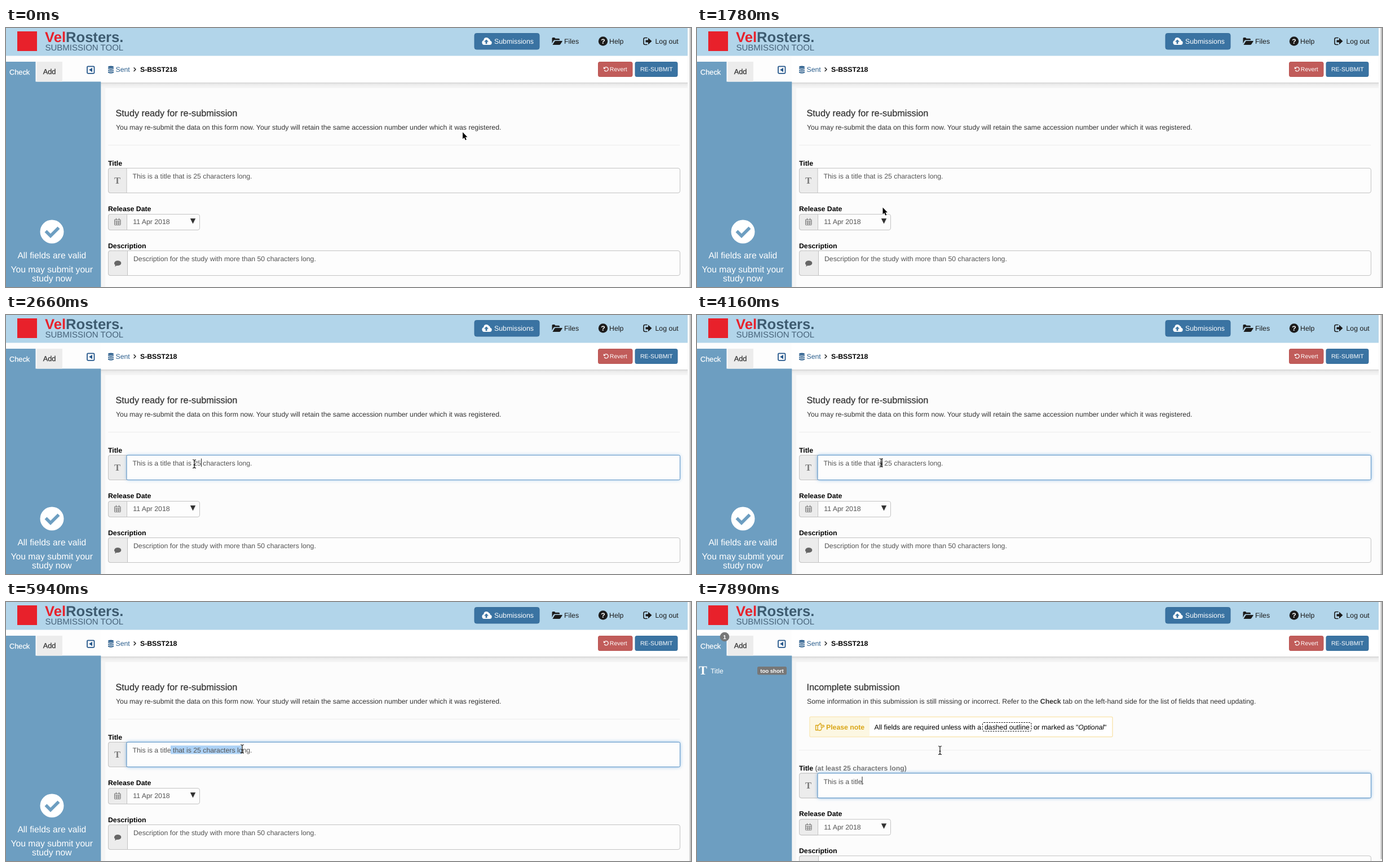
Write an HTML page that moves like this. It is 1215 px wide and 461 px high and loops after 8 s.

```html
<!DOCTYPE html>
<html lang="en">
<head>
<meta charset="utf-8">
<title>Study form</title>
<style>
html, body { margin: 0; width: 100%; height: 100%; overflow: hidden; background: #fff; }
svg { display: block; width: 100%; height: 100%; }
text { font: 12.28px "Liberation Sans", Arial, sans-serif; fill: #333; text-rendering: geometricPrecision; white-space: pre; }
.b { font-weight: 700; }
.k { fill: #000; }
.w { fill: #fff; }
.m { stroke: currentColor; stroke-width: .25; }
.nav { font-size: 12.35px; fill: #1c1c1c; }
.tab { font-size: 12.8px; }
.btn { font-size: 10.5px; fill: #fff; }
.head { font-size: 16.25px; color: #333; }
.in { fill: #555; }
.msg { font-size: 15.65px; fill: #fff; text-anchor: middle; }
.serif { font-family: "Liberation Serif", "Times New Roman", serif; font-weight: 700; text-anchor: middle; }
.box { fill: #fdfdfd; stroke: #c2c2c2; }
.add { fill: #ececec; stroke: #c2c2c2; }
.line { fill: none; stroke-linecap: round; stroke-linejoin: round; }
#glow { filter: drop-shadow(0 0 3.4px rgba(70, 145, 215, .7)); }
</style>
</head>
<body>
<svg viewBox="0 0 1215 461" preserveAspectRatio="none">
  <defs>
    <linearGradient id="shade" x2="0" y2="1">
      <stop stop-color="#d2d2d2"/><stop offset=".35" stop-color="#ebebeb"/><stop offset="1" stop-color="#f5f5f5"/>
    </linearGradient>
  </defs>

  <!-- page -->
  <rect width="1215" height="461" fill="#fdfdfd"/>
  <rect x="168" y="97" width="1041" height="364" fill="#f5f5f5"/>
  <rect x="168" y="97" width="1041" height="9" fill="url(#shade)"/>
  <rect x="176" y="107" width="1033" height="354" fill="#fcfcfc"/>
  <rect x="168" y="50" width="1041" height="47" fill="#fff"/>
  <rect width="1209" height="49.5" fill="#b2d5ea"/>
  <rect x="1209" width="6" height="461" fill="#fafafa"/>
  <rect id="thumb" x="1212.5" y="-4" width="2.5" height="469" rx="1.2" fill="#c3c3c3"/>

  <!-- header -->
  <rect x="20" y="6" width="35" height="35" fill="#e8212b"/>
  <text x="69" y="24.5" class="b" style="font-size:25.6px;fill:#e8212b">Vel<tspan fill="#3d5b70">Rosters.</tspan></text>
  <text x="69.5" y="39.5" style="font-size:15px;fill:#47637a">SUBMISSION TOOL</text>
  <rect x="831" y="9.5" width="115" height="28.5" rx="3.5" fill="#3a73a2" stroke="#366d9a"/>
  <path d="M848 30a4.3 4.3 0 0 1-.8-8.3 5.2 5.2 0 0 1 9.6-2.3 3.2 3.2 0 0 1 2 3.3 3.7 3.7 0 0 1-1 7.3z" fill="#fff"/>
  <path d="M852 20.5l-4 4h2.6v3.8h2.8v-3.8h2.6z" fill="#3a73a2"/>
  <text x="866" y="28" class="nav" style="fill:#fff">Submissions</text>
  <g fill="#1c1c1c">
    <path d="M968.5 27.5V18.5q0-1.5 1.5-1.5h3l1.500 1.800h6q1.500 0 1.500 1.500v1.200h-8.500q-1.500 0-2.500 1.200z"/>
    <path d="M969.500 30l3.500-6q.7-1 1.800-1h11.200q1.200 0 .6 1l-3.300 5q-.8 1-2 1z"/>
    <circle cx="1059" cy="23.5" r="8.2"/>
    <path d="M1137 17.5h-3.5q-2.5 0-2.5 2.5v7q0 2.5 2.5 2.5h3.5" class="line" stroke="#1c1c1c" stroke-width="1.6"/>
    <path d="M1134.5 21.500h4.500v-4l6.500 6-6.500 6v-4h-4.500z"/>
  </g>
  <text x="1059" y="28" class="b w" style="text-anchor:middle">?</text>
  <text x="990" y="28" class="nav">Files</text>
  <text x="1070" y="28" class="nav">Help</text>
  <text x="1151.5" y="28" class="nav">Log out</text>

  <!-- breadcrumb -->
  <g fill="#2e608e">
    <ellipse cx="186" cy="69.5" rx="5" ry="2"/>
    <path id="disk" d="M181 71.2q5 2.4 10 0v1.8q-5 2.8-10 0z"/>
    <use href="#disk" y="3.2"/>
    <use href="#disk" y="6.4"/>
  </g>
  <text x="194.5" y="78.300" style="fill:#2e608e">Sent</text>
  <path d="M227 70.8l3 3-3 3" class="line" stroke="#111" stroke-width="1.3"/>
  <text x="238" y="78.3" class="b k">S-BSST218</text>
  <rect x="1050.5" y="60.500" width="60.500" height="26" rx="2.600" fill="#c15c5a" stroke="#bb5553"/>
  <path d="M1061.300 71.500a3.700 3.700 0 1 1 .3 4" class="line" stroke="#fff" stroke-width="1.300"/>
  <path d="M1059.800 69v3.800h3.800z" fill="#fff"/>
  <text x="1070.800" y="77.300" class="btn">Revert</text>
  <rect x="1116" y="60.500" width="75" height="26" rx="2.600" fill="#3a73a2" stroke="#366d9a"/>
  <text x="1125" y="77.300" class="btn">RE-SUBMIT</text>

  <!-- sidebar -->
  <rect y="95.500" width="168.300" height="366" fill="#6d9ec1"/>
  <rect y="60" width="52.500" height="37" fill="#6d9ec1"/>
  <rect x="54.500" y="60" width="45.500" height="35.500" fill="#ececec"/>
  <text x="6" y="82.500" class="tab w m" color="#fff">Check</text>
  <text x="65.700" y="82.300" class="tab m" color="#333">Add</text>
  <rect x="144" y="68.300" width="12.500" height="12.500" rx="1.500" fill="none" stroke="#24568a" stroke-width="1.800"/>
  <path d="M153 70.800v7.600l-5.800-3.800z" fill="#24568a"/>
  <g id="valid">
    <circle cx="81.500" cy="362.500" r="21" fill="#fff"/>
    <path d="M70.500 361.500l8.500 8.500 14.500-14.500" fill="none" stroke="#6d9ec1" stroke-width="5.600"/>
    <text x="81.300" y="409.800" class="msg">All fields are valid</text>
    <text x="81.300" y="435" class="msg">You may submit your</text>
    <text x="81.300" y="451.300" class="msg">study now</text>
  </g>
  <g id="invalid">
    <circle cx="49" cy="62" r="8.300" fill="#777"/>
    <text x="49" y="65.500" class="b w" style="font-size:10px;text-anchor:middle">1</text>
    <text x="10.700" y="129" class="serif w" style="font-size:22px">T</text>
    <text x="24" y="126.500" class="w">Title</text>
    <rect x="107" y="115" width="52" height="14.500" rx="2.500" fill="#777"/>
    <text x="133" y="125.500" class="b w" style="font-size:9.600px;text-anchor:middle">too short</text>
  </g>

  <!-- notices -->
  <g id="ready">
    <text x="194.500" y="157.300" class="head m">Study ready for re-submission</text>
    <text x="195" y="181.300">You may re-submit the data on this form now. Your study will retain the same accession number under which it was registered.</text>
  </g>
  <g id="incomplete">
    <text x="194.500" y="157.300" class="head m">Incomplete submission</text>
    <text x="195" y="181.300">Some information in this submission is still missing or incorrect. Refer to the <tspan class="b">Check</tspan> tab on the left-hand side for the list of fields that need updating.</text>
    <rect x="200" y="204.500" width="537" height="35.500" rx="2" fill="#fff" stroke="#f9e6b4" stroke-width="1.500"/>
    <rect x="200.700" y="205.200" width="105.300" height="34" fill="#fcf7e2"/>
    <path d="M210.500 219.500h3.500v8.500h-3.500zM214 219.500h1.500l3.200-3.700q2 .3 1 3.700h5q1.700 1.400 0 2.800h-5.200M221.500 222.300q.8 1.200-.5 2.300.5 1.300-.7 2.100 0 1.800-1.800 1.800h-2l-2.500-.8" class="line" stroke="#d9a514" stroke-width="1.300"/>
    <text x="229" y="226.500" class="b" style="fill:#d9a514">Please note</text>
    <text x="314.500" y="226.500" class="k">All fields are required unless with a</text>
    <rect x="506.500" y="214.500" width="86.500" height="15.500" rx="2.500" fill="none" stroke="#000" stroke-dasharray="2.600 1.800"/>
    <text x="510" y="226.500" class="k">dashed outline</text>
    <text x="597" y="226.500" class="k">or marked as "<tspan font-style="italic">Optional</tspan>"</text>
  </g>

  <!-- fields -->
  <g id="form">
    <path d="M181 208.500H1195.500" stroke="#ededed"/>
    <text x="181" y="244.500" class="b k">Title<tspan id="hint" x="209.500" fill="#777">(at least 25 characters long)</tspan></text>
    <rect x="181.500" y="249.500" width="1014" height="44" rx="3.500" class="box"/>
    <path d="M214 249.500H185q-3.500 0-3.500 3.500v37q0 3.500 3.500 3.500h29z" class="add"/>
    <text x="197.500" y="276.500" class="serif" style="font-size:16.500px;fill:#777">T</text>
    <g id="focus">
      <rect id="glow" x="214" y="249.500" width="981.500" height="44" rx="2" fill="#5a93c6"/>
      <rect x="214" y="249.500" width="981.500" height="44" rx="2" fill="#fdfdfd" stroke="#5a93c6"/>
    </g>
    <rect id="sel" x="292" y="255.500" height="15" fill="#acd1f5"/>
    <text id="value" x="224.500" y="268.300" class="in"></text>
    <path id="caret" d="M0 255.500v14.500" stroke="#222"/>

    <text x="181" y="326" class="b k">Release Date</text>
    <rect x="181.500" y="331.500" width="162" height="28" rx="3.500" class="box"/>
    <path d="M214.500 331.500H185q-3.500 0-3.500 3.500v21q0 3.500 3.500 3.500h29.500z" class="add"/>
    <path d="M193 341h10v9.500h-10zM193 344h10M193 347.200h10M196.300 344v6.500M199.700 344v6.500M195.500 339v2.500M200.500 339v2.500" class="line" stroke="#6a6a6a" stroke-width=".9"/>
    <text x="225.300" y="349.300" class="in">11 Apr 2018</text>
    <path d="M326.800 339h9.400l-4.700 9.500z" fill="#333"/>

    <text x="181" y="391.700" class="b k">Description</text>
    <rect x="181.500" y="396.500" width="1014" height="44" rx="3.500" class="box"/>
    <path d="M215.500 396.500H185q-3.500 0-3.500 3.500v37q0 3.500 3.500 3.500h30.500z" class="add"/>
    <path d="M198.300 414c8 0 8 9 0 9q-1 0-2-.2-1.500 1.500-3.500 1.700 1-1 1-2.500c-4-3-1-8 4.500-8z" fill="#666"/>
    <text x="226" y="415.300" class="in">Description for the study with more than 50 characters long.</text>
  </g>

  <!-- pointers -->
  <path id="arrow" d="M0 0v12l2.700-2.400 2.100 4.500 2-.9-2.100-4.400h3.700z" stroke="#fff" stroke-width="1.200" paint-order="stroke"/>
  <path id="beam" d="M-3-7.500q2.500 0 3 1.500 .5-1.500 3-1.500M-3 7.500q2.500 0 3-1.500 .5 1.500 3 1.500M0-6v12M-1.500 1.500h3" fill="none" stroke="#111" stroke-width="1.200"/>
</svg>
<script>
const LOOP = 8000, FOCUS = 2510, DELETED = 7890, SEL_X = 292;

// time, pointer x, pointer y
const moves = [
  [0, 810, 185.5], [300, 808, 188], [450, 800, 194], [600, 765, 215], [750, 717, 245],
  [900, 680, 270], [1040, 640, 293], [1190, 540, 308], [1340, 436, 318], [1490, 385, 332],
  [1640, 350, 336], [1780, 329.5, 319.5], [1930, 328, 302], [2080, 331, 278], [2230, 333, 268],
  [2370, 334, 265], [2810, 331, 264], [2960, 327, 263], [4160, 326.5, 263], [4310, 326, 263],
  [4610, 322, 263], [4760, 308, 264], [4900, 296, 265], [5050, 290.5, 265], [5350, 316, 265],
  [5500, 350, 264], [5650, 386, 263], [5790, 406, 262], [5940, 419, 261.5], [6090, 425, 262],
  [6240, 428, 262], [6690, 431, 262], [7140, 431, 264]
];
// time, caret x (0 = hidden)
const carets = [[0, 0], [FOCUS, 346.5], [2810, 0], [3260, 328.5], [5200, 292.5], [5350, 0], [DELETED, 293]];
// time, right edge of the selection
const selections = [[0, SEL_X], [5350, 311], [5500, 339], [5650, 373], [5790, 399], [5940, 418],
  [6090, 425], [6690, 432], [DELETED, SEL_X]];

const $ = id => document.getElementById(id);
const at = (table, t) => table.findLast(row => row[0] <= t);
const show = (id, on) => $(id).setAttribute("visibility", on ? "visible" : "hidden");
const place = (id, x, y) => $(id).setAttribute("transform", `translate(${x} ${y})`);

function draw(t) {
  const [, x, y] = at(moves, t);
  const caret = at(carets, t)[1];
  const done = t >= DELETED;
  const inField = t >= 2080;

  for (const id of ["valid", "ready"]) show(id, !done);
  for (const id of ["invalid", "incomplete", "hint"]) show(id, done);
  place("form", 0, done ? 55.3 : 0);
  $("thumb").setAttribute("height", done ? 462 : 469);
  $("value").textContent = done ? "This is a title." : "This is a title that is 25 characters long.";

  show("focus", t >= FOCUS);
  const step = Math.floor((t - 2660) / 150);
  $("glow").style.opacity = step < 0 ? 0 : Math.min(1, 0.7 + step * 0.15);

  show("caret", caret > 0);
  place("caret", caret, 0);
  $("sel").setAttribute("width", at(selections, t)[1] - SEL_X);

  show("arrow", !inField);
  show("beam", inField);
  place(inField ? "beam" : "arrow", x, y);
}

const start = performance.now();
function tick() {
  draw((performance.now() - start) % LOOP);
  requestAnimationFrame(tick);
}
tick();
</script>
</body>
</html>
```
